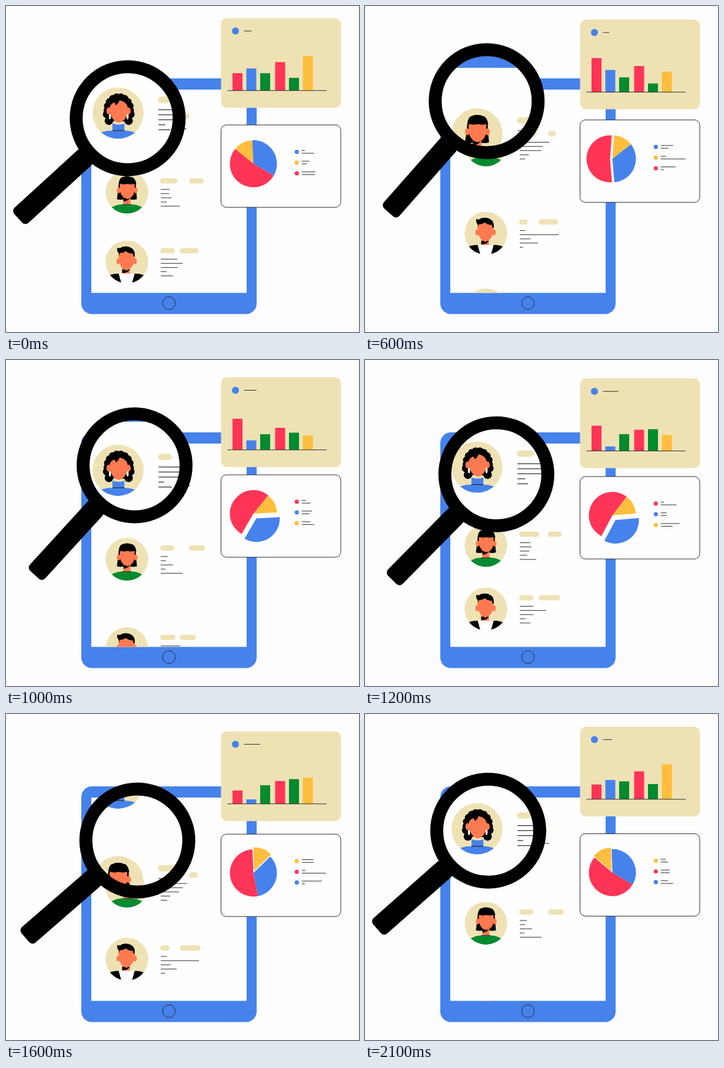
Write an HTML page that moves like this. It is 600 px wide and 554 px high and loops after 2.2 s.

```html
<!DOCTYPE html>
<html lang="en">
<head>
<meta charset="utf-8">
<title>Candidate search</title>
<style>
  html, body { margin: 0; width: 100%; height: 100%; overflow: hidden; background: #fefdfe; }
  svg { display: block; width: 600px; height: 554px; }
  .blue { fill: #4682eb; }
  .red { fill: #ff3557; }
  .green { fill: #048a2f; }
  .yellow { fill: #ffbe3d; }
  .sand { fill: #eee2b5; }
  .white { fill: #fefefe; }
  .skin { fill: #ff7a50; }
  .thin { fill: none; stroke: #2a2a2a; stroke-width: 1; }
</style>
</head>
<body>
<svg viewBox="0 0 600 554">
  <defs>
    <clipPath id="screen"><rect x="145" y="142" width="264" height="345.5"/></clipPath>
    <clipPath id="face"><circle r="36.5"/></clipPath>
    <clipPath id="lens"><circle id="lensClip" r="77"/></clipPath>
  </defs>

  <g id="tablet">
    <rect class="blue" x="128" y="123" width="298" height="400.5" rx="18"/>
    <rect class="white" x="145" y="142" width="264" height="345.5"/>
    <circle class="thin" cx="277" cy="505" r="10.8"/>
    <g clip-path="url(#screen)">
      <g class="row">
        <g clip-path="url(#face)">
          <circle class="sand" r="36.5"/>
          <g id="curls"></g>
          <path d="M-14-16Q0-27 15-15L17 10Q8 14-13 10Z"/>
          <ellipse class="skin" cx="-13.5" cy="-3" rx="3" ry="5"/>
          <ellipse class="skin" cx="15" cy="-3" rx="3" ry="5"/>
          <path class="skin" d="M-12-8Q-10-14-5-15L-3-11Q1-14 2-18Q13-16 14-6Q13 11 1 14Q-11 11-12-8Z"/>
          <path class="blue" d="M-8 15Q1 18 9 15V25Q22 25 36 33V40H-35V33Q-24 25-8 25Z"/>
          <path class="thin" d="M-8 25H9"/>
          <ellipse class="white" cx="-11.5" cy="5" rx="1.5" ry="4"/>
          <ellipse class="white" cx="13.5" cy="5" rx="1.5" ry="4"/>
        </g>
      </g>
      <g class="row">
        <g clip-path="url(#face)">
          <circle class="sand" r="36.5"/>
          <path d="M-14-13Q-13-27 0-27Q14-27 15-13L17 12Q11 14 4 12H-5Q-11 14-17 12Z"/>
          <path class="skin" d="M-6 8H6V24H-6Z"/>
          <path d="M6 9Q3 15-6 16V10Z"/>
          <ellipse class="skin" cx="-14" cy="-3" rx="3.2" ry="5"/>
          <ellipse class="skin" cx="15" cy="-3" rx="3.2" ry="5"/>
          <path class="skin" d="M-12-15H13V-3Q12 9 1 12Q-10 9-12-3Z"/>
          <path d="M-14-13Q-13-23-9-25H10Q15-22 16-13L12-14L7-13L1-14L-5-13L-10-14Z"/>
          <path class="green" d="M-38 36Q-24 21-9 21H9Q24 21 38 36V40H-38Z"/>
          <path class="thin" d="M-8 21H8"/>
        </g>
      </g>
      <g class="row">
        <g clip-path="url(#face)">
          <circle class="sand" r="36.5"/>
          <path class="skin" d="M-8 8H5V24H-8Z"/>
          <path d="M5 13Q2 19-8 19V13Z"/>
          <ellipse class="skin" cx="-15" cy="-1" rx="2.8" ry="5"/>
          <ellipse class="skin" cx="14" cy="-1" rx="2.8" ry="5"/>
          <path class="skin" d="M-14-17H13V-3Q11 11-1 15Q-12 11-14-3Z"/>
          <path d="M-14-9Q-13-13-14-15Q-18-19-16-24Q-11-22-9-25Q0-28 7-24Q15-20 13-8Q11-9 10-14Q3-14-2-18Q-6-15-12-15Q-13-12-14-9Z"/>
          <path class="white" d="M-16 20H14L20 40H-20Z"/>
          <path d="M-36 25Q-26 20-13 20L-8 38H-25ZM34 25Q25 20 13 20L8 38H24Z"/>
          <path class="white" d="M-14 20H13L8 38H-9Z"/>
        </g>
      </g>
    </g>
  </g>

  <g id="barCard">
    <rect class="sand" x="365.5" width="204" height="152.5" rx="10"/>
    <circle class="blue" cx="390" cy="22" r="6"/>
    <path class="thin" id="caption"/>
    <g id="bars"></g>
    <path class="thin" d="M376.5 123.3H545"/>
  </g>

  <g id="pieCard">
    <rect class="thin" style="fill:#fefefe" x="365.5" width="203.5" height="140" rx="9"/>
    <g id="pie" transform="translate(420.5 66)"></g>
    <g id="legend"></g>
  </g>

  <g clip-path="url(#lens)">
    <use href="#tablet" transform="translate(-55.1 -64.7) scale(1.195)"/>
  </g>
  <g id="glass">
    <circle r="87.5" fill="none" stroke="#000" stroke-width="22"/>
    <rect id="handle" x="92" y="-17.5" width="160" height="35" rx="7.5"/>
  </g>
</svg>

<script>
const LOOP = 2200, STEP = 100;
const $ = id => document.getElementById(id);

function add(parent, tag, attrs) {
  const el = document.createElementNS('http://www.w3.org/2000/svg', tag);
  set(el, attrs);
  parent.append(el);
  return el;
}
function set(el, attrs) {
  for (const k in attrs) el.setAttribute(k, attrs[k]);
}
const wave = (t, mid, amp, peak) => mid + amp * Math.cos(2 * Math.PI * (t - peak) / LOOP);

// Linear interpolation of values at the given times.
function track(times, values, t) {
  let i = 0;
  while (i < times.length - 2 && t >= times[i + 1]) i++;
  const f = (t - times[i]) / (times[i + 1] - times[i]);
  return values[i] + (values[i + 1] - values[i]) * f;
}

// ---- scrolling list: widths at arrival, at rest and on leaving
const ROWS = [
  { y: 206.3, x2: 84.5, pills: [[20, 28, 22], [20, 27, 20]],
    lines: [[34, 42, 30], [50, 32, 24], [30, 47, 30], [8, 13, 20], [19, 12, 8]] },
  { y: 315, x2: 105.5, pills: [[24, 41, 30], [27, 21, 13]],
    lines: [[12, 22, 52], [9, 27, 41], [21, 13, 37], [8, 16, 16], [37, 22, 8]] },
  { y: 423, x2: 89.5, pills: [[26, 23, 14], [28, 42, 34]],
    lines: [[33, 17, 8], [29, 55, 68], [35, 15, 18], [9, 11, 32], [24, 14, 5]] },
];
const CYCLES = [{ leave: 250, arrive: 1070 }, { leave: 1348, arrive: 2194 }];
const rowEls = [...document.querySelectorAll('.row')];

for (let i = 0; i < 14; i++) {
  const a = Math.PI * (0.74 + 1.52 * i / 13);
  add($('curls'), 'circle', { cx: 1 + 16.5 * Math.cos(a), cy: -5 + 18 * Math.sin(a), r: 5.2 });
}
for (const s of [-1, 1]) {
  add($('curls'), 'circle', { cx: 1 + s * 17, cy: 2, r: 5.5 });
  add($('curls'), 'circle', { cx: 1 + s * 14, cy: 11, r: 6 });
}
ROWS.forEach((row, i) => {
  row.pillEls = row.pills.map((_, j) =>
    add(rowEls[i], 'rect', { class: 'sand', x: j ? row.x2 : 56.5, y: -23.5, height: 9, rx: 4.5 }));
  row.lineEl = add(rowEls[i], 'path', { class: 'thin' });
});

function rowY(i, t) {
  if (t < 200) t += LOOP;
  const { leave, arrive } = CYCLES[t < 1250 ? 0 : 1], base = ROWS[i].y;
  const up = base - Math.max(0, 0.015 * (t - leave - 64 * i)) ** 3;
  if (up > 70) return up;
  const left = Math.min(1, Math.max(0, (arrive + 51 * i - t) / 454));
  const ease = left < 0.5 ? 4 * left ** 3 : 1 - 4 * (1 - left) ** 3;
  return base + 310 * ease;
}
function drawRows(t) {
  const u = ((t + 100) % 1100) / 1100;
  const width = k => track([0, 0.3, 0.62, 1], [...k, k[0]], u);
  ROWS.forEach((row, i) => {
    set(rowEls[i], { transform: `translate(205.5 ${rowY(i, t)})` });
    row.pillEls.forEach((el, j) => set(el, { width: width(row.pills[j]) }));
    set(row.lineEl, { d: row.lines.map((k, j) => `M57.5 ${7.1 * j - 4.5}h${width(k)}`).join('') });
  });
}

// ---- bar chart: class, left edge, mean height, swing, time of the peak
const BARS = [
  ['red', 385, 39, 20, 720], ['blue', 408.5, 24.5, 20, 300], ['green', 432, 28.5, 3.5, 1750],
  ['red', 457.5, 42.5, 6.5, 150], ['green', 481, 27.5, 15, 1510], ['yellow', 504.7, 42, 17.5, 2100],
];
const barEls = BARS.map(([c, x]) => add($('bars'), 'rect', { class: c, x, width: 17 }));

function drawBars(t) {
  set($('barCard'), { transform: `translate(0 ${wave(t, 25.5, 6, 1300)})` });
  set($('caption'), { d: `M404.5 22h${wave(t, 18.5, 10.5, 1450)}` });
  BARS.forEach(([, , mid, amp, peak], i) => {
    const height = wave(t, mid, amp, peak);
    set(barEls[i], { y: 123.3 - height, height });
  });
}

// ---- pie chart; one slice after another pops out
const SLICES = [['yellow', 48], ['blue', 123], ['red', 189]];
const ORDER = ['blue', 'yellow', 'red'];
const POP = ['red', 'blue', 'yellow'];
const TIMES = [0, 300, 600, 1000, 1200, 1600, 2100];
const LEGEND = [
  [5, 12, 21, 7, 5, 20, 8], [21, 30, 13, 15, 27, 20, 12],
  [13, 5, 9, 17, 10, 6, 15], [9, 22, 42, 13, 10, 41, 15],
  [23, 43, 25, 15, 32, 34, 12], [22, 13, 5, 21, 20, 5, 21],
];
const sliceEls = SLICES.map(([c]) => add($('pie'), 'path', { class: c }));
const dotEls = ORDER.map((_, i) => add($('legend'), 'circle', { cx: 494.3, cy: 45.8 + 18.2 * i, r: 3.6 }));
const legendLines = add($('legend'), 'path', { class: 'thin' });

function point(deg, r) {
  const a = deg * Math.PI / 180;
  return [r * Math.sin(a), -r * Math.cos(a)];
}
function drawPie(t) {
  const part = t * 3 / LOOP, third = Math.floor(part);
  const pop = 11 * Math.sin(Math.PI * (part - third)) ** 1.65;
  set($('pieCard'), { transform: `translate(0 ${wave(t, 199.3, 6, 1820)})` });
  let from = wave(t, 354.5, 45.5, 1075);
  SLICES.forEach(([c, size], i) => {
    const to = from + size;
    const shift = point(from + size / 2, c === POP[third] ? pop : 0);
    set(sliceEls[i], {
      d: `M0 0L${point(from, 40)}A40 40 0 ${size > 180 ? 1 : 0} 1 ${point(to, 40)}Z`,
      transform: `translate(${shift})`,
    });
    from = to;
  });
  dotEls.forEach((el, i) => set(el, { class: ORDER[(i - third + 3) % 3] }));
  set(legendLines, {
    d: LEGEND.map((k, i) => {
      const y = 43.4 + 18.2 * (i >> 1) + 4.7 * (i % 2);
      return `M502.8 ${y}h${track([...TIMES, LOOP], [...k, k[0]], t)}`;
    }).join(''),
  });
}

function drawGlass(t) {
  const x = wave(t, 214, 11, 1400), y = wave(t, 188.6, 27, 1677);
  set($('lensClip'), { cx: x, cy: y });
  set($('glass'), { transform: `translate(${x} ${y})` });
  set($('handle'), { transform: `rotate(${180 - wave(t, 44.5, 4.4, 720)})` });
}

const start = performance.now();
function frame() {
  const t = Math.floor((performance.now() - start) % LOOP / STEP) * STEP;
  drawRows(t);
  drawBars(t);
  drawPie(t);
  drawGlass(t);
  requestAnimationFrame(frame);
}
frame();
</script>
</body>
</html>
```
